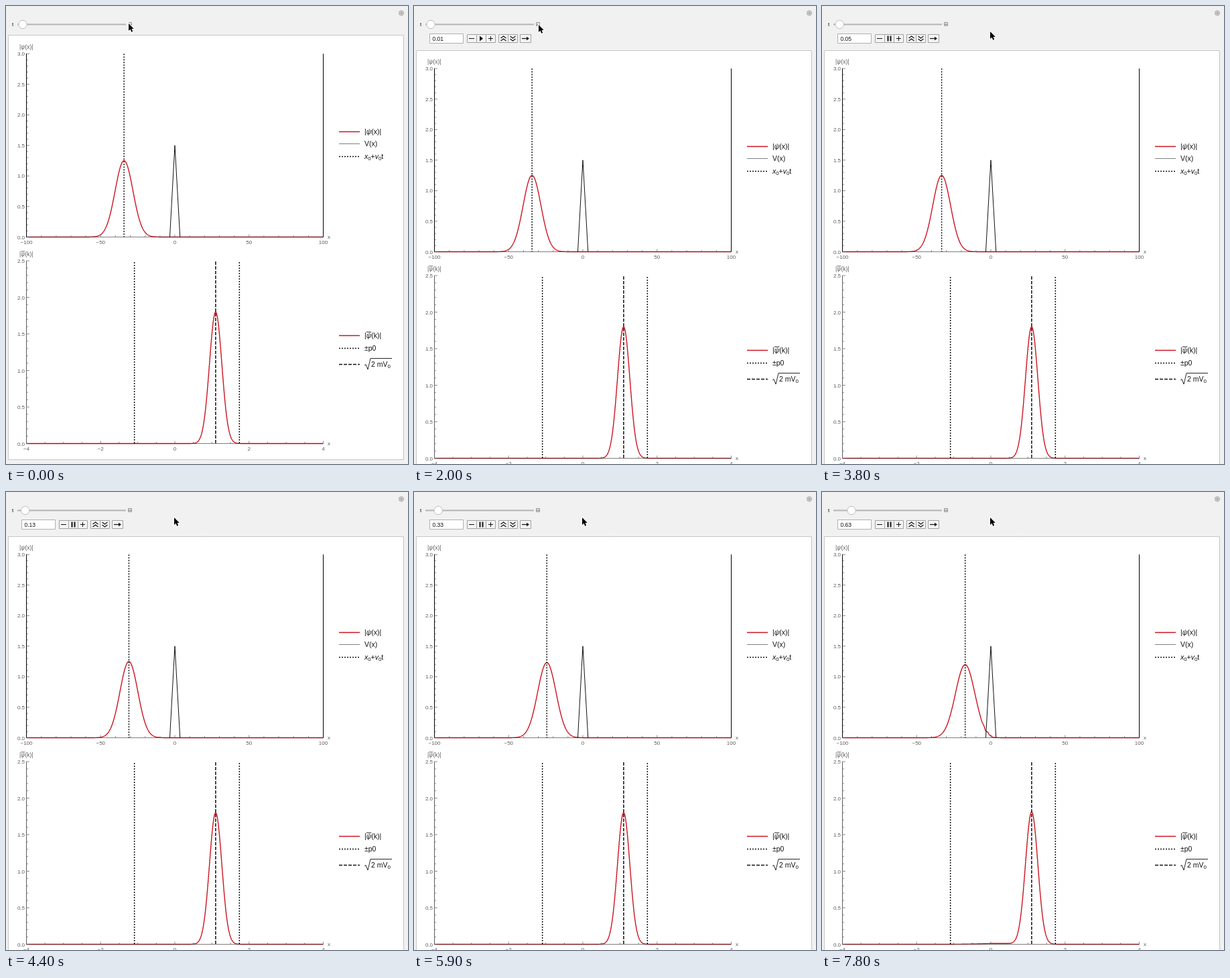
Recreate the animation shown at these times as an HTML page with a canvas. Size 600x683 px, loop 8 s.

```html
<!DOCTYPE html>
<html lang="en">
<head>
<meta charset="utf-8">
<title>Wave packet and barrier</title>
<style>
  html, body { margin: 0; width: 100%; height: 100%; overflow: hidden; background: #f2f1f2; }
  canvas { display: block; }
</style>
</head>
<body>
<canvas id="stage" width="600" height="683"></canvas>
<script>
const c = document.getElementById('stage').getContext('2d');
const LOOP = 8000, STEP = 100;
const SANS = '"Liberation Sans", Arial, sans-serif';
const RED = '#cb1420', GREY = '#5c5c5c', INK = '#111';
const DOTS = [2, 2], DASHES = [5, 2];

// Each key is [time, ...values]; values move linearly between keys.
const cursorKeys = [[0, 183, 26], [900, 183, 26], [1100, 186, 28], [2200, 186, 28],
  [2500, 146, 57], [2650, 110, 59], [2800, 99, 48], [3000, 99, 48], [3600, 251, 38]];
const plotKeys = [[3500, .01], [4400, .13], [5900, .375], [6700, .49], [7800, .63]];
const readoutKeys = [[3500, .01], [4400, .13], [5900, .33], [6700, .49], [7800, .63]];
const pauses = [3700, 4000, 4700, 5400];

function at(keys, time) {
  if (time <= keys[0][0]) return keys[0].slice(1);
  const i = keys.findIndex(k => k[0] > time);
  if (i < 0) return keys[keys.length - 1].slice(1);
  const a = keys[i - 1], b = keys[i], u = (time - a[0]) / (b[0] - a[0]);
  return a.slice(1).map((v, j) => v + (b[j + 1] - v) * u);
}

function path(points, { color = INK, width = 1, dash = [], fill, close } = {}) {
  c.beginPath();
  points.forEach(([x, y]) => c.lineTo(x, y));
  if (close) c.closePath();
  if (fill) { c.fillStyle = fill; c.fill(); }
  c.setLineDash(dash);
  c.strokeStyle = color;
  c.lineWidth = width;
  if (width) c.stroke();
  c.setLineDash([]);
}
const line = (x1, y1, x2, y2, style) => path([[x1, y1], [x2, y2]], style);

function box(x, y, w, h, fill, color) {
  path([[x, y], [x + w, y], [x + w, y + h], [x, y + h]], { fill, color, close: true });
}

function disc(x, y, r, fill, color) {
  c.beginPath();
  c.arc(x, y, r, 0, 7);
  if (fill) { c.fillStyle = fill; c.fill(); }
  c.strokeStyle = color;
  c.lineWidth = 1;
  c.stroke();
}

function text(str, x, y, size, color = INK, align = 'left', style = '') {
  c.font = `${style} ${size}px ${SANS}`;
  c.fillStyle = color;
  c.textAlign = align;
  c.fillText(str, x, y);
  return c.measureText(str).width;
}

// Parts: '/' makes italic, '_' makes subscript, '^' puts a bar over an italic letter.
function formula(parts, x, y, size, color) {
  for (const part of parts) {
    const mark = '/_^'.includes(part[0]) ? part[0] : '', str = mark ? part.slice(1) : part;
    const sub = mark === '_', italic = mark === '/' || mark === '^';
    const w = text(str, x, y + (sub ? 2 : 0), sub ? size * .75 : size, color, 'left', italic ? 'italic' : '');
    if (mark === '^') line(x, y - size * .84, x + w, y - size * .84, { color, width: .9 });
    x += w;
  }
}

// Axes from x = -range to range over the same 443 pixels.
function makePlot(range, baseY, unitY, maxY) {
  const X = v => 252 + v * 221.5 / range, Y = v => baseY - v * unitY;
  return {
    X, Y,
    curve(f) {
      const points = [];
      for (let px = 30.5; px <= 473.5; px += .5)
        points.push([px, Y(f((px - 252) * range / 221.5))]);
      path(points, { color: RED, width: 1.4 });
    },
    axes(minorX, majorX) {
      line(30.5, baseY, 473.5, baseY, { color: 'rgba(50,40,40,.6)' });
      line(30.5, baseY, 30.5, Y(maxY), { color: GREY });
      for (let i = 0; i <= Math.round(maxY * 10); i++) {
        const major = i % 5 === 0, y = Y(i / 10);
        line(30.5, y, major ? 35 : 33, y, { color: GREY, width: .7 });
        if (major) text((i / 10).toFixed(1), 28, y + 3, 8, GREY, 'right');
      }
      for (let v = -range; v <= range; v += minorX) {
        const major = v % majorX === 0;
        line(X(v), baseY, X(v), baseY - (major ? 4 : 2.5), { color: GREY, width: .7 });
        if (major) text(String(v).replace('-', '−'), X(v), baseY + 10.5, 8, GREY, 'center');
      }
      text('x', 480, baseY + 2.5, 8, GREY);
    }
  };
}
const position = makePlot(100, 344.5, 91.1, 3);
const momentum = makePlot(4, 652.5, 109, 2.5);

function drawPlots(t) {
  const center = -34.5 + 27.3 * t, spread = 1 + (24.8 * t / 36) ** 2;
  const contact = Math.max(0, (t - .5) / .13);
  const { X, Y } = position;

  position.curve(x => {
    const packet = 1.25 * spread ** -.25 * Math.exp(-((x - center) ** 2) / (72 * spread));
    const ripple = x < 0
      ? .15 * Math.cos(2.2 * (x + 2)) * Math.exp(-(((x + 2) / 3) ** 2))
      : -.6 * Math.min(1, x / 1.5);
    return packet * (1 + contact * ripple);
  });
  position.axes(10, 50);
  path([[X(-3.4), Y(0)], [X(0), Y(1.5)], [X(3.5), Y(0)]]);
  for (const x of [30.5, 473.5]) line(x, Y(0), x, Y(3), { color: '#000' });
  line(X(center), Y(3), X(center), Y(0), { width: 1.5, dash: DOTS });
  formula(['|', '/ψ', '(x)|'], 20, 64, 8.5, GREY);

  momentum.curve(k => (1.8 + .01 * contact) * Math.exp(-18 * (k - 1.1) ** 2)
    + .012 * contact * Math.exp(-(((k - .2) / .7) ** 2)));
  momentum.axes(.5, 2);
  for (const k of [-1.09, 1.74])
    line(momentum.X(k), 382, momentum.X(k), 652, { width: 1.5, dash: DOTS });
  line(momentum.X(1.1), 381, momentum.X(1.1), 652, { width: 1.5, dash: DASHES });
  formula(['|', '^ψ', '(k)|'], 20, 373, 8.5, GREY);
}

function drawLegends() {
  const row = (y, style, parts) => {
    line(497, y, 528, y, style);
    formula(parts, 535, y + 3.5, 10.5, INK);
  };
  row(187.5, { color: RED, width: 1.5 }, ['|', '/ψ', '(x)|']);
  row(205.5, { color: '#808080' }, ['V(x)']);
  row(224.5, { width: 1.5, dash: DOTS }, ['/x', '_0', '+', '/v', '_0', 't']);
  row(491.5, { color: RED, width: 1.5 }, ['|', '^ψ', '(k)|']);
  row(510.5, { width: 1.5, dash: DOTS }, ['±p0']);
  row(534.5, { width: 1.5, dash: DASHES }, []);
  path([[535, 536], [537, 534.5], [540, 542], [544, 525.5], [576, 525.5]], { width: .9 });
  formula(['2 mV', '_0'], 545, 538, 10.5, INK);
}

function drawSlider(t) {
  text('t', 9, 30, 8);
  line(17, 27.5, 179, 27.5, { color: '#b4b4b4', width: 2 });
  disc(25 + 30.6 * (t - .01), 27.5, 6.2, '#fff', '#bdbdbd');
  box(182.5, 24.5, 5, 5, '#ddd', '#9a9a9a');
  line(183, 27.5, 188, 27.5, { color: '#888' });
  disc(590, 10.5, 3.6, '#d8d8d8', '#a4a4a4');
  line(588, 10.5, 592, 10.5, { color: '#999' });
  line(590, 8.5, 590, 12.5, { color: '#999' });
}

function drawControls(value, playing) {
  box(23.5, 41.5, 50, 14, '#fff', '#b0b0b0');
  text(value.toFixed(2), 27.5, 52, 8.5);
  for (const [x, w] of [[79.5, 14], [93.5, 14], [107.5, 14], [126.5, 14], [140.5, 14], [158.5, 16]])
    box(x, 42.5, w, 12, '#f4f4f4', '#a0a0a0');
  line(82, 48.5, 90, 48.5);
  if (playing) for (const x of [98.5, 102.5]) line(x, 44.5, x, 52.5, { width: 2 });
  else path([[98, 44.5], [103, 48.5], [98, 52.5]], { fill: INK, width: 0, close: true });
  line(111, 48.5, 118, 48.5);
  line(114.5, 45, 114.5, 52);
  for (const [x, dir] of [[133.5, 1], [147.5, -1]])
    for (const dy of [-2, 2])
      path([[x - 4, 48.5 + dy + 1.5 * dir], [x, 48.5 + dy - 1.5 * dir], [x + 4, 48.5 + dy + 1.5 * dir]],
        { width: 1.2 });
  line(161, 48.5, 171, 48.5, { width: 1.2 });
  path([[168, 45.8], [172, 48.5], [168, 51.2]], { fill: INK, width: 0, close: true });
}

function drawCursor([x, y]) {
  const shape = [[0, 0], [0, 11], [2.5, 8.8], [4.3, 12.8], [6.2, 12], [4.5, 8], [7.8, 8]];
  const points = shape.map(([dx, dy]) => [x + dx, y + dy]);
  path(points, { color: '#fff', width: 2, close: true });
  path(points, { fill: '#000', width: 0, close: true });
}

function draw(now) {
  const time = Math.floor(now % LOOP / STEP) * STEP;
  const plotTime = pauses.includes(time) ? time - STEP : time;
  const expanded = time >= 2000;
  const [t] = at(plotKeys, plotTime), [readout] = at(readoutKeys, plotTime);

  c.fillStyle = '#f2f1f2';
  c.fillRect(0, 0, 600, 683);
  drawSlider(t);
  if (expanded) drawControls(readout, time >= 3000);
  box(3.5, expanded ? 66.5 : 43.5, 590, 633, '#fff', '#c6c6c6');
  c.save();
  c.translate(0, expanded ? 22 : 0);
  drawPlots(t);
  drawLegends();
  c.restore();
  drawCursor(at(cursorKeys, time));
}

const start = performance.now();
function tick() {
  draw(performance.now() - start);
  requestAnimationFrame(tick);
}
tick();
</script>
</body>
</html>
```
